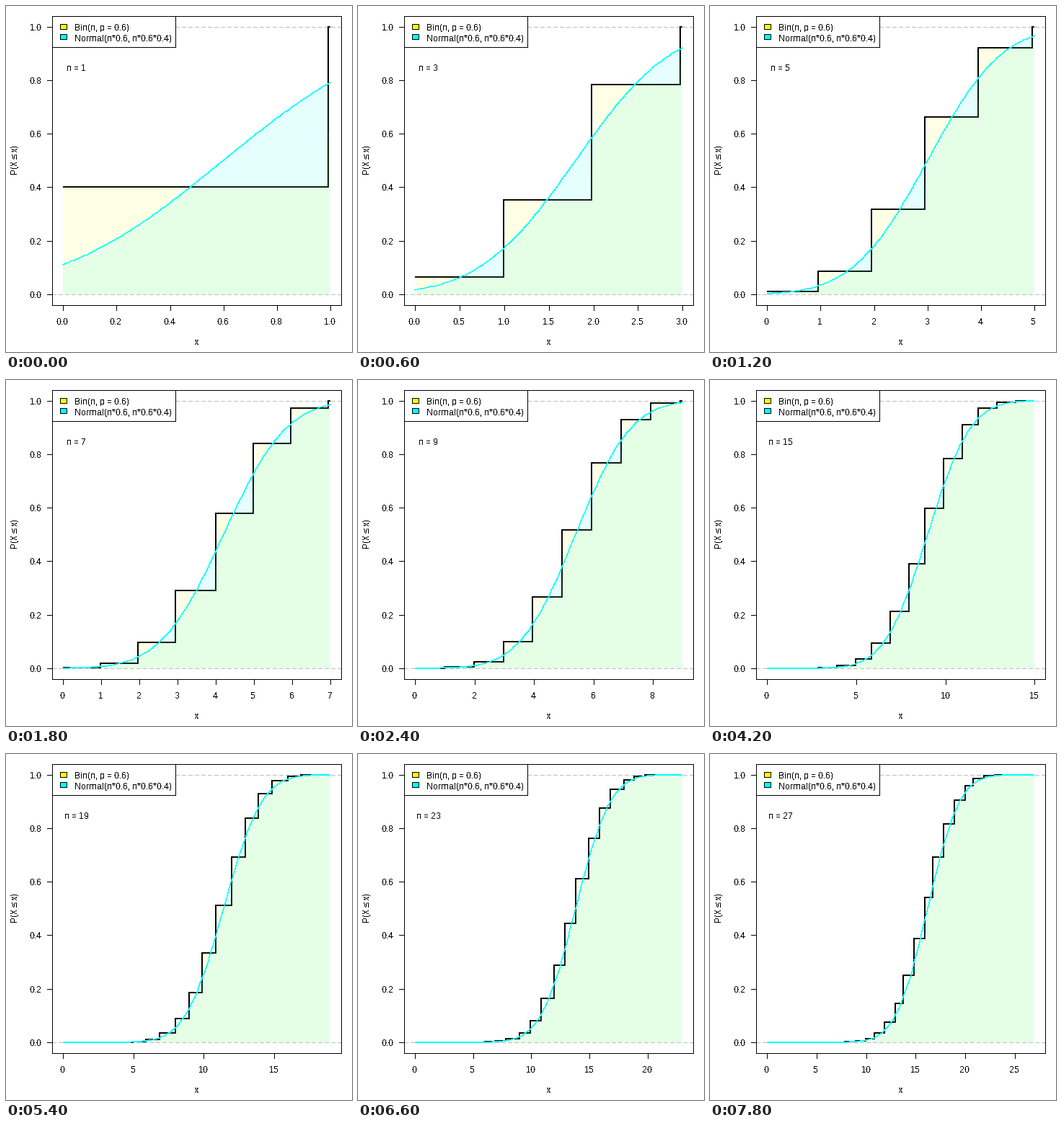
A matplotlib script that plays this animation: 480 by 480 pixels, repeating every 8000 ms.

```python
import math

import matplotlib.pyplot as plt
import numpy as np
from matplotlib.animation import FuncAnimation
from matplotlib.patches import Polygon, Rectangle

SIZE, DPI = 480, 96
PX = 72 / DPI  # points per pixel
P = 0.6
LEFT, RIGHT, TOP, BOTTOM = 64.8, 465.6, 14.4, 415.2
SPAN = (RIGHT - LEFT) / 1.08  # pixels per full range, 4 % padding each side

plt.rcParams.update({
    "font.family": "Liberation Sans",
    "font.size": 12 * PX,
    "text.hinting": "native",
    "text.hinting_factor": 1,
    "text.antialiased": False,
    "path.simplify": False,
    "path.snap": False,
    "lines.solid_capstyle": "butt",
})

fig = plt.figure(figsize=(SIZE / DPI, SIZE / DPI), dpi=DPI, facecolor="white")
ax = fig.add_axes([0, 0, 1, 1])


def to_x(u):
    return np.floor(LEFT + SPAN * (0.04 + np.asarray(u)))


def to_y(v):
    return np.floor(BOTTOM - SPAN * (0.04 + np.asarray(v)))


def line(x, y, color="black", width=1, **kw):
    ax.plot(x, y, color=color, lw=width * PX, antialiased=False, **kw)


def fill(x, y, color):
    base = to_y(0)
    points = [(x[0], base), *zip(x, y), (x[-1], base)]
    ax.add_patch(Polygon(points, facecolor=color, alpha=0.1, lw=0,
                         antialiased=False))


def box(left, top, right, bottom, color):
    ax.add_patch(Rectangle((left + 0.5, top + 0.5), right - left, bottom - top,
                           facecolor=color, edgecolor="black", lw=PX,
                           antialiased=False, zorder=3))


def label(x, y, text, ha="center", **kw):
    ax.text(x, y, text, ha=ha, va="baseline", zorder=4, **kw)


def binomial_cdf(x, n):
    mass = [math.comb(n, k) * P**k * (1 - P)**(n - k) for k in range(n + 1)]
    return np.cumsum(mass)[np.floor(x + 1e-7).astype(int)]


def normal_cdf(x, n):
    scale = math.sqrt(2 * n * P * (1 - P))
    return np.array([0.5 * (1 + math.erf((v - n * P) / scale)) for v in x])


def tick_step(n):
    for limit, step in ((1, 0.2), (3, 0.5), (7, 1), (14, 2)):
        if n <= limit:
            return step
    return 5


def draw_axes(n):
    box(64, 14, 465, 415, "none")
    step = tick_step(n)
    for i in range(int(n / step + 1e-9) + 1):
        x = to_x(i * step / n)
        line([x + 0.5] * 2, [416, 423])
        label(x - 0.5, 442, f"{i * step:.{int(step < 1)}f}")
    for i in range(6):
        y = to_y(i / 5)
        line([57, 64], [y + 0.5] * 2)
        label(50, y + 5, f"{i / 5:.1f}", ha="right")
    label(264, 470, "x")
    ax.text(18, 213, "P(X \u2264 x)", rotation=90, ha="right", va="center")


def draw_legend():
    box(64, 14, 235, 57, "white")
    box(75, 25, 84, 32, "yellow")
    box(75, 39, 84, 46, "cyan")
    label(95, 34, "Bin(n, p = 0.6)", ha="left")
    label(95, 49, "Normal(n*0.6, n*0.6*0.4)", ha="left")


def draw(frame):
    n = 1 + frame // 3
    ax.clear()
    ax.set(xlim=(0, SIZE), ylim=(SIZE, 0))
    ax.axis("off")

    for level in (0, 1):
        line([64, 465], [to_y(level) + 0.5] * 2, "#bebebe", dashes=(5, 3),
             dash_capstyle="butt", zorder=0.5)

    # Each riser stands at the sample just before the jump.
    u = np.linspace(0, 1, 101)
    x = to_x(u)
    stairs = to_y(binomial_cdf(u * n, n))
    curve = to_y(normal_cdf(u * n, n))
    line(np.repeat(x, 2)[:-1], np.repeat(stairs, 2)[1:], width=2, zorder=0.8,
         drawstyle="steps-pre")
    fill(x, stairs, "yellow")
    fill(x, curve, "cyan")
    # Without smoothing every touched pixel is filled, so this thin pen
    # leaves a stroke two pixels wide.
    line(x, curve, "cyan", 0.4, zorder=2)

    draw_axes(n)
    draw_legend()
    label(98, 90, f"n = {n}")
    return []


anim = FuncAnimation(fig, draw, frames=80, interval=100, init_func=lambda: [],
                     repeat=True, repeat_delay=0)
plt.show()
```
